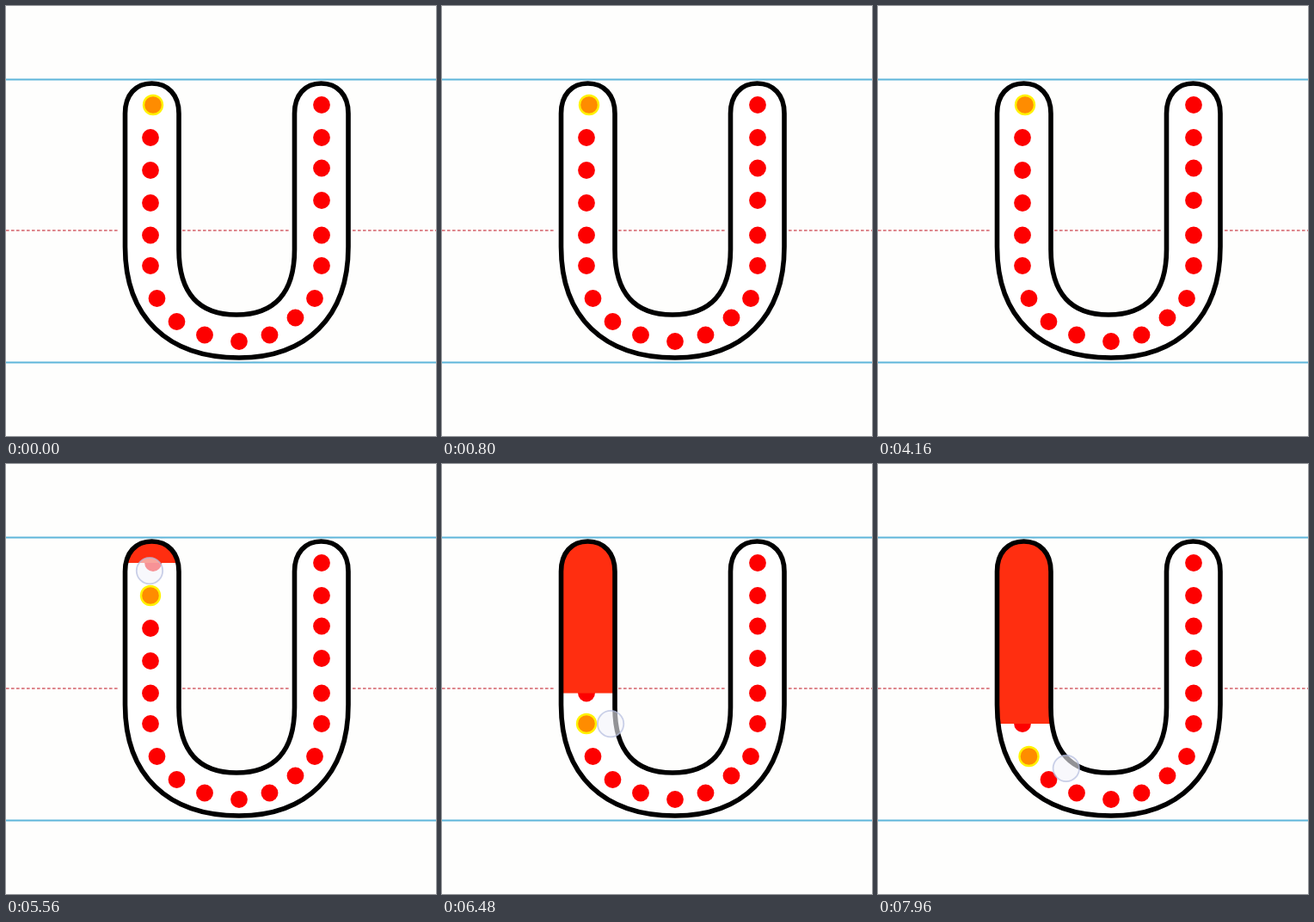
Animation, 500 px wide and 500 px high, one loop 8 s. Source, as an HTML page with a canvas:

```html
<!DOCTYPE html>
<html lang="en">
<head>
<meta charset="utf-8">
<title>Letter tracing</title>
<style>
  html, body { margin: 0; width: 100%; height: 100%; overflow: hidden; background: #fefefd; }
  canvas { display: block; width: 500px; height: 500px; }
</style>
</head>
<body>
<canvas id="stage" width="500" height="500"></canvas>
<script>
const ctx = document.getElementById('stage').getContext('2d');
const LOOP = 8000;

const letter = new Path2D(`M138.5 125 C138.5 103 151 90 169.5 90 S201 103 201 125
  V283 C201 335 225 359 268 359 S335.5 335 335.5 283
  V125 C335.5 103 348 90 366.5 90 S398 103 398 125
  V280 C398 362 349 409 271 409 C188 409 138.5 362 138.5 280 Z`);

const dots = [
  [171, 115], [168, 153], [168, 191], [168, 229], [168, 266.5], [168, 302],
  [175.5, 340], [198.5, 367], [231, 382.5], [271, 390], [306.5, 382.5],
  [336.5, 362.5], [359, 340], [367, 302], [367, 266.5], [367, 226],
  [367, 188.5], [367, 153], [367, 115]
];

// Moment at which each dot is reached by the pointer.
const hits = [5480, 5700, 5880, 6080, 6280, 6520];

// Pointer path: time, x, y.
const path = [
  [5400, 168, 113], [5560, 167, 124], [6000, 160, 209], [6240, 170, 258],
  [6480, 196, 302], [6840, 224, 351], [7200, 262, 378], [7480, 302, 376],
  [7560, 302, 376], [7960, 219, 354], [8000, 216, 351]
];

function slope(i, axis) {
  const a = path[Math.max(i - 1, 0)], b = path[Math.min(i + 1, path.length - 1)];
  return (b[axis] - a[axis]) / (b[0] - a[0]);
}

function pointerAt(t) {
  let i = 0;
  while (i < path.length - 2 && t >= path[i + 1][0]) i++;
  const a = path[i], b = path[i + 1], span = b[0] - a[0], u = (t - a[0]) / span;
  const still = a[1] === b[1] && a[2] === b[2];
  return [1, 2].map(k => still ? a[k] :
    a[k] * (1 + 2 * u) * (1 - u) ** 2 + b[k] * u * u * (3 - 2 * u) +
    span * (slope(i, k) * u * (1 - u) ** 2 - slope(i + 1, k) * u * u * (1 - u)));
}

function disc(x, y, r, fill) {
  ctx.beginPath();
  ctx.arc(x, y, r, 0, Math.PI * 2);
  ctx.fillStyle = fill;
  ctx.fill();
}

function line(x1, x2, y) {
  ctx.beginPath();
  ctx.moveTo(x1, y);
  ctx.lineTo(x2, y);
  ctx.stroke();
}

function drawGuides() {
  ctx.fillStyle = '#fefefd';
  ctx.fillRect(0, 0, 500, 500);
  ctx.strokeStyle = '#5eb6da';
  ctx.lineWidth = 1.8;
  line(0, 500, 85.5);
  line(0, 500, 414.5);
  ctx.strokeStyle = '#d4606a';
  ctx.lineWidth = 1.5;
  ctx.setLineDash([3.6, 2.4]);
  line(0, 131, 261);
  line(205, 331, 261);
  line(403, 500, 261);
  ctx.setLineDash([]);
}

function drawLetter(next) {
  ctx.fillStyle = '#fff';
  ctx.fill(letter);
  dots.forEach(([x, y], i) => {
    if (i === next) {
      disc(x, y, 12.2, '#fff200');
      disc(x, y, 9.8, '#ff8c00');
    } else {
      disc(x, y, 9.9, '#fd0000');
    }
  });
  if (next > 0) {
    ctx.save();
    ctx.clip(letter);
    ctx.fillStyle = '#ff2e10';
    ctx.fillRect(135, 85, 70, dots[next - 1][1] - 85);
    ctx.restore();
  }
  ctx.strokeStyle = '#000';
  ctx.lineWidth = 5.6;
  ctx.stroke(letter);
}

function drawPointer(t) {
  const [x, y] = pointerAt(t);
  disc(x, y, 15.2, 'rgba(244,244,250,.6)');
  ctx.strokeStyle = 'rgba(180,188,222,.7)';
  ctx.lineWidth = 1.8;
  ctx.stroke();
}

function frame(now) {
  const t = now % LOOP;
  drawGuides();
  drawLetter(hits.filter(hit => t >= hit).length);
  if (t >= path[0][0]) drawPointer(t);
  requestAnimationFrame(frame);
}
requestAnimationFrame(frame);
</script>
</body>
</html>
```
